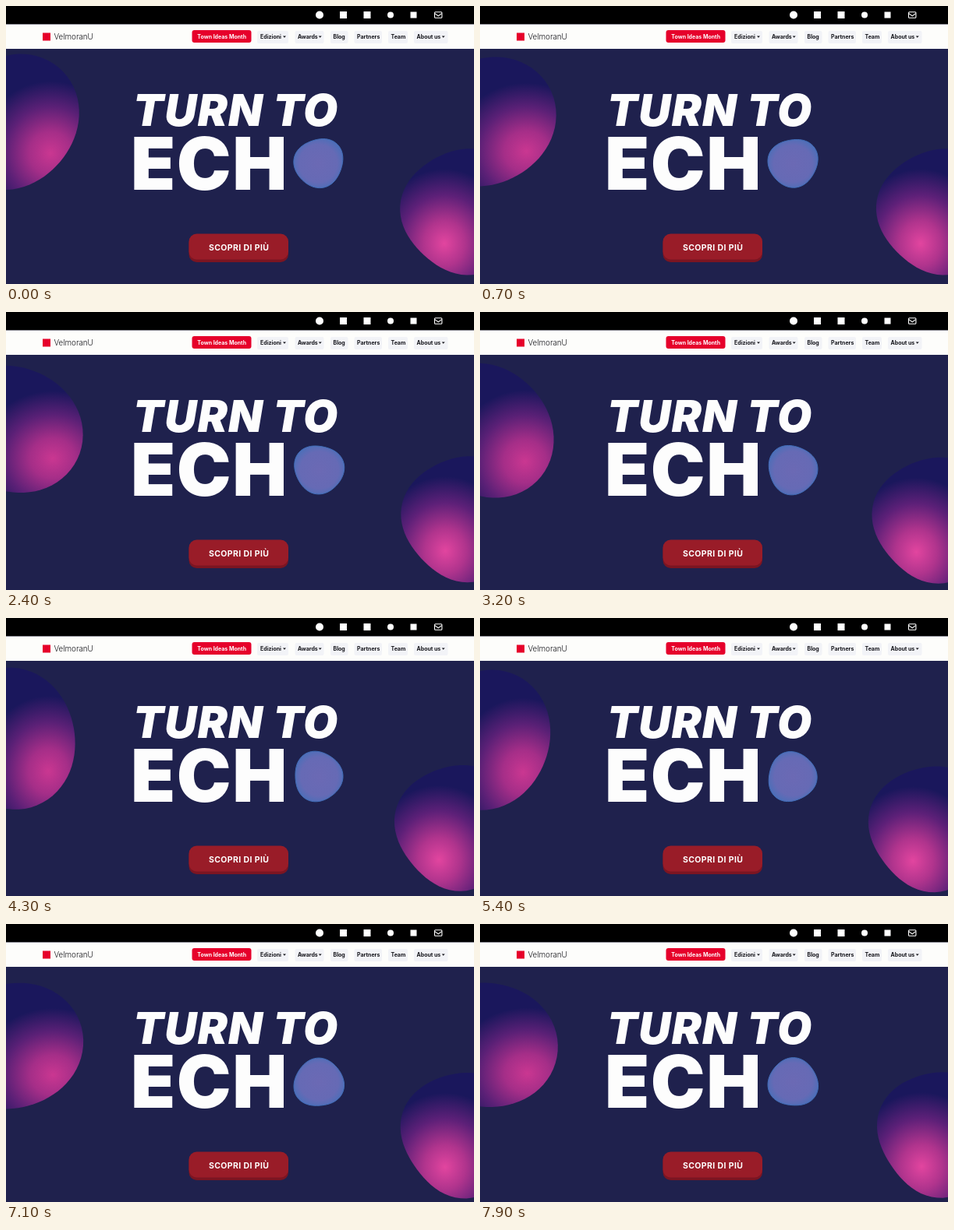
Recreate the animation shown at these times as an HTML page. Size 600x357 px, loop 8000 ms.

```html
<!DOCTYPE html>
<html lang="it">
<head>
<meta charset="utf-8">
<title>Turn to Echo</title>
<style>
  html, body { margin: 0; width: 100%; height: 100%; overflow: hidden; background: #1f214d; }
  svg { display: block; width: 600px; height: 357px; font-family: Inter, "Open Sans", sans-serif; }
  .pill { fill: #f2f3f7; }
  .nav { font-size: 7px; font-weight: 700; fill: #15151b; }
  .icon { fill: #fff; }
  .hero { fill: #fdfdfd; font-weight: 900; }
  .top { font-size: 57px; font-style: italic; letter-spacing: 1.2px; }
  .main { font-size: 93.5px; letter-spacing: 1.5px; }
  .cta { font-size: 10.5px; font-weight: 700; letter-spacing: .4px; fill: #fff; text-anchor: middle; }
  .brand { font-size: 9.8px; font-weight: 300; fill: #17171c; }
</style>
</head>
<body>
<svg viewBox="0 0 600 357">
  <defs>
    <radialGradient id="glowLeft" cx=".785" cy=".73" r=".53">
      <stop offset="0" stop-color="#ca3791"/>
      <stop offset=".3" stop-color="#a52e88"/>
      <stop offset=".65" stop-color="#5a2076"/>
      <stop offset="1" stop-color="#1a175c"/>
    </radialGradient>
    <radialGradient id="glowRight" cx=".38" cy=".75" r=".59">
      <stop offset="0" stop-color="#e2459f"/>
      <stop offset=".3" stop-color="#b0348d"/>
      <stop offset=".65" stop-color="#5d2078"/>
      <stop offset="1" stop-color="#1a175c"/>
    </radialGradient>
    <radialGradient id="glowDot" r=".55">
      <stop offset="0" stop-color="#6b69b4"/>
      <stop offset=".7" stop-color="#666ab5"/>
      <stop offset="1" stop-color="#4b6fb9"/>
    </radialGradient>
  </defs>

  <rect width="600" height="357" fill="#1f214d"/>
  <path id="left" fill="url(#glowLeft)"/>
  <path id="right" fill="url(#glowRight)"/>

  <g class="hero">
    <text class="top" x="163" y="154">TURN TO</text>
    <text class="main" x="160" y="236">ECH</text>
  </g>
  <path id="dot" fill="url(#glowDot)" stroke="#416db8"/>

  <rect x="234.5" y="294" width="127.5" height="35" rx="10" fill="#7b1522"/>
  <rect x="234.5" y="292.5" width="127.5" height="33" rx="10" fill="#991c28"/>
  <text class="cta" x="298.7" y="314.4">SCOPRI DI PIÙ</text>

  <rect width="600" height="23.5" fill="#000"/>
  <rect y="23.5" width="600" height="31.5" fill="#fdfdfb"/>

  <g class="icon">
    <circle cx="402" cy="11.5" r="5"/>
    <rect x="428" y="7" width="9" height="9"/>
    <rect x="458.5" y="7" width="9" height="9"/>
    <circle cx="493" cy="11.5" r="4"/>
    <rect x="518.5" y="7.5" width="8" height="8"/>
  </g>
  <g fill="none" stroke="#fff" stroke-width="1.1">
    <rect x="549.5" y="7.8" width="9.4" height="7.4" rx="1"/>
    <path d="M549.8 9.6 L554.2 12.8 L558.6 9.6"/>
  </g>

  <rect x="47" y="34.5" width="10" height="10" fill="#e6002b"/>
  <text class="brand" x="61.5" y="43.2">VelmoranU</text>

  <rect x="238.5" y="31" width="76" height="16" rx="3" fill="#e6002b"/>
  <g class="pill">
    <rect x="322" y="32" width="40" height="16" rx="2"/>
    <rect x="370.5" y="32" width="37" height="16" rx="2"/>
    <rect x="416" y="32" width="22.5" height="16" rx="2"/>
    <rect x="446.5" y="32" width="35.5" height="16" rx="2"/>
    <rect x="490" y="32" width="25" height="16" rx="2"/>
    <rect x="523" y="32" width="43.5" height="16" rx="2"/>
  </g>
  <g class="nav">
    <text x="276.7" y="41.9" text-anchor="middle" style="fill:#fff">Town Ideas Month</text>
    <text x="326" y="41.9">Edizioni</text>
    <text x="374" y="41.9">Awards</text>
    <text x="419.5" y="41.9">Blog</text>
    <text x="450" y="41.9">Partners</text>
    <text x="493.5" y="41.9">Team</text>
    <text x="526.5" y="41.9">About us</text>
    <path d="M355 38.6h4l-2 2.2z M400.7 38.6h4l-2 2.2z M558.7 38.6h4l-2 2.2z"/>
  </g>
</svg>
<script>
const LOOP = 8, STEP = .1, POINTS = 72;
const rad = deg => deg * Math.PI / 180;
const swing = (t, peak, period) => Math.cos(2 * Math.PI * (t - peak) / period);

// A blob is a circle with waves running round its rim:
// n crests of height amp, one at angle `crest`, its phase turning by `spin` degrees a second.
const blobs = [
  { id: 'left', x: 8.5, y: 148.5, r: 85.5, driftX: 0, driftY: 4.3,
    waves: [{ n: 2, amp: 6, crest: -50, spin: 60 }] },
  { id: 'right', x: 581, y: 266, r: 77.5, driftX: 6, driftY: 3,
    waves: [{ n: 2, amp: 3, crest: 90, spin: 0 }, { n: 3, amp: 4, crest: 66, spin: 5 }] },
  { id: 'dot', x: 400.8, y: 202.7, r: 31.3, driftX: .8, driftY: 1.5,
    waves: [{ n: 2, amp: .8, crest: -45, spin: 60 }, { n: 3, amp: 1.4, crest: -45, spin: 30 }] }
];
for (const b of blobs) b.path = document.getElementById(b.id);

function outline(b, t) {
  const cx = b.x + b.driftX * swing(t, 1.3, 7.2);
  const cy = b.y + b.driftY * (b.id === 'left' ? 1 : 0) - b.driftY * swing(t, .7, 11);
  const pts = Array.from({ length: POINTS }, (_, i) => {
    const deg = i * 360 / POINTS;
    const r = b.waves.reduce((sum, w) =>
      sum + w.amp * Math.cos(rad(w.n * (deg - w.crest) - w.spin * t)), b.r);
    return (cx + r * Math.cos(rad(deg))).toFixed(2) + ' ' + (cy + r * Math.sin(rad(deg))).toFixed(2);
  });
  return 'M' + pts.join('L') + 'Z';
}

const start = performance.now();
function tick() {
  const t = (performance.now() - start) / 1000 % LOOP;
  const held = Math.floor(t / STEP) * STEP;
  for (const b of blobs) b.path.setAttribute('d', outline(b, held));
  requestAnimationFrame(tick);
}
tick();
</script>
</body>
</html>
```
